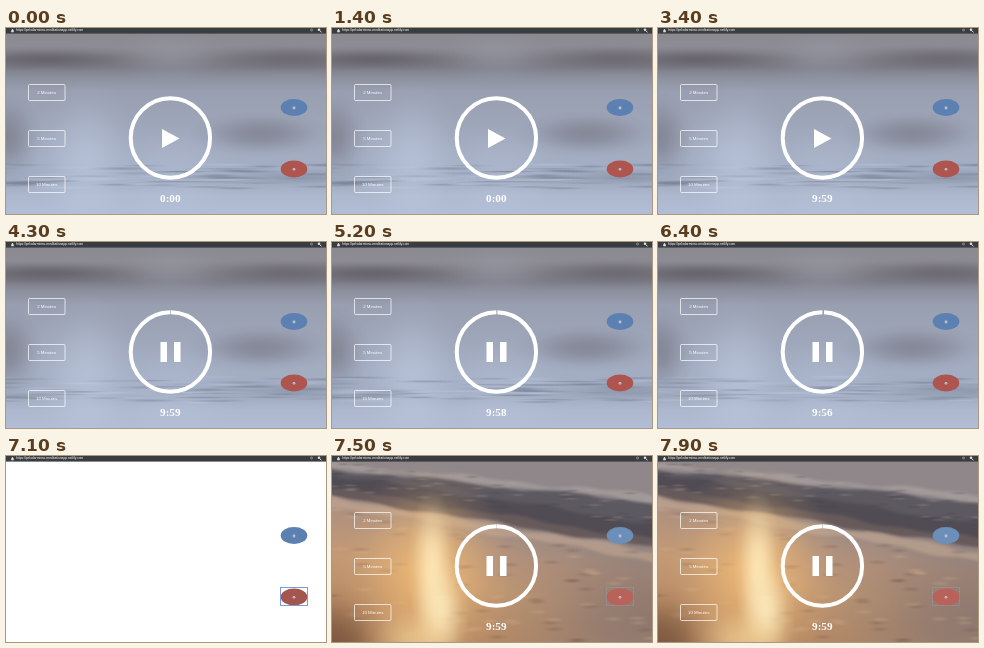
An HTML page with a canvas that plays this animation: 320 px wide and 186 px high, repeating every 8 s.

```html
<!DOCTYPE html>
<html lang="en">
<head>
<meta charset="utf-8">
<style>
html, body { margin: 0; width: 100%; height: 100%; overflow: hidden; background: #fff; }
canvas, svg { position: absolute; left: 0; top: 0; width: 320px; height: 186px; }
text { font-family: "Liberation Sans", Arial, sans-serif; fill: #fff; }
</style>
</head>
<body>
<canvas id="bg" width="320" height="186"></canvas>
<svg viewBox="0 0 320 186">
  <rect width="320" height="5.6" fill="#3a3d40"/>
  <path d="M5.2 2.2h2.6v2h-2.6zM5.8 2.2v-.6a.7 .7 0 0 1 1.4 0v.6" fill="#ddd"/>
  <text x="10" y="3.4" font-size="3.28">https://pelodarminso-meditationapp.netlify.com</text>
  <circle cx="305.5" cy="2" r="1" fill="none" stroke="#bbb" stroke-width=".6"/>
  <circle cx="313" cy="1.8" r="1.3" fill="#ddd"/>
  <path d="M313.5 2.5l2 1.7" stroke="#ddd"/>
  <g id="choices"></g>
  <path id="ring" fill="none" stroke="#fff" stroke-width="4"/>
  <path id="play" d="M156 101v19l17.5-9.5z" fill="#fff"/>
  <path id="pause" d="M154.5 100h6.5v20h-6.5zM168 100h6.5v20h-6.5z" fill="#fff"/>
  <text id="clock" x="164.3" y="174" font-size="11.2" font-weight="700" text-anchor="middle" style="font-family:'Liberation Serif','Times New Roman',serif"></text>
  <ellipse id="rain" cx="288" cy="79.5" rx="13.3" ry="8.5"/>
  <ellipse id="beach" cx="288" cy="141" rx="13.3" ry="8.5"/>
  <g fill="#cbd2dc"><circle cx="288" cy="80" r="1.4"/><circle cx="288" cy="141.3" r="1.3"/></g>
  <path d="M287 80h1.5M287.3 141.3h1.4" stroke="#77798a" stroke-width=".6"/>
  <rect id="focus" x="274.5" y="131.5" width="27" height="18" fill="none"/>
</svg>
<script>
const $ = id => document.getElementById(id);
const ctx = $("bg").getContext("2d");
const W = 320, H = 186, LOOP = 8000;

$("choices").innerHTML = [2, 5, 10].map((n, i) => {
  const y = 56.5 + i * 46;
  return `<rect x="22.5" y="${y}" width="36.5" height="16" rx="1" fill="none" stroke="#fff" stroke-opacity=".7"/>
    <text x="40.7" y="${y + 9.6}" font-size="4.4" text-anchor="middle">${n} Minutes</text>`;
}).join("");

function random(seed) {
  return () => (seed = (seed * 16807) % 2147483647) / 2147483647;
}

function fill(gradient, stops) {
  stops.forEach(([at, color]) => gradient.addColorStop(at, color));
  ctx.fillStyle = gradient;
  ctx.fillRect(0, 0, W, H);
}

// soft ellipse with radii rx, ry
function glow(x, y, rx, ry, rgb, alpha) {
  ctx.save();
  ctx.translate(x, y);
  ctx.scale(rx, ry);
  const g = ctx.createRadialGradient(0, 0, 0, 0, 0, 1);
  [1, .84, .5, .16, 0].forEach((k, i) => g.addColorStop(i / 4, `rgba(${rgb},${alpha * k})`));
  ctx.fillStyle = g;
  ctx.fillRect(-1, -1, 2, 2);
  ctx.restore();
}

function drawRain(s) {
  const dark = "96,92,100", light = "196,208,230";
  fill(ctx.createLinearGradient(0, 0, 0, H), [
    [.03, "#8b8a91"], [.1, "#8d8c94"], [.17, "#7f7e87"], [.21, "#7c7c87"],
    [.27, "#8d919f"], [.34, "#989fb0"], [.5, "#9da5b8"], [.68, "#a3adc2"],
    [.76, "#a2adc3"], [.83, "#a0abc0"], [.9, "#adb8ce"], [1, "#b1bdd5"]
  ]);
  glow(40, 31, 110, 13, "74,68,74", .45);
  glow(285, 30, 100, 15, "74,68,74", .35);
  glow(165, 30, 60, 30, "165,170,184", .3);
  glow(0, 110, 38, 48, dark, .45);
  glow(255, 106, 75, 24, dark, .42);
  glow(80, 135, 55, 85, light, .5);
  glow(165, 150, 75, 60, light, .25);

  // ripples drift and swell with the video time s
  const rnd = random(71);
  for (let i = 0; i < 60; i++) {
    const y = 136 + 24 * rnd(), phase = rnd() * 7, dir = i % 2 ? 1 : -1;
    const x = (rnd() * 400 + s * 14 * dir + 400) % 400 - 40;
    const a = .24 + .1 * Math.sin(s * 4 + phase);
    glow(x, y + Math.sin(s * 3 + phase), 20 + rnd() * 30, 1.3 + rnd(), i % 3 ? "92,101,120" : light, a);
  }
  glow(300, 149, 85, 9, "92,100,118", .25);
}

// stripe sloping down to the right, following the shoreline
function band(y, slope, height, color, s, seed) {
  const edge = x => y + x * slope + 1.6 * Math.sin(x / 23 + seed + s * 2) + Math.sin(x / 9 + seed * 3);
  ctx.fillStyle = color;
  ctx.beginPath();
  for (let x = -10; x <= 330; x += 5) ctx.lineTo(x, edge(x));
  for (let x = 330; x >= -10; x -= 5) ctx.lineTo(x, edge(x + 30) + height);
  ctx.fill();
}

function drawBeach(s) {
  fill(ctx.createLinearGradient(40, 0, 0, H), [
    [0, "#8f878a"], [.2, "#988a85"], [.36, "#b3927c"], [.55, "#c39a74"],
    [.8, "#b98c65"], [1, "#a17655"]
  ]);
  glow(320, 165, 200, 105, "136,116,110", .9);
  const rnd = random(19);
  ctx.filter = "blur(1.5px)";
  band(11, .11, 21, "#5d5961", s, 1);
  band(19, .15, 15, "#514c54", s, 2);
  band(32, .16, 4, "#675a5b", s, 3);
  band(7, .1, 3, "rgba(176,166,163,.6)", s, 5);
  band(41, .17, 4, "rgba(203,174,150,.5)", s, 6);
  ctx.filter = "none";
  for (let i = 0; i < 70; i++) {
    const x = rnd() * W, y = 6 + rnd() * 30 + x * .1;
    glow(x + s * 6, y, 10, 2, i % 2 ? "180,168,164" : "64,60,70", .22);
  }
  for (let i = 0; i < 80; i++) {
    const x = rnd() * W, y = 52 + x * .14 + rnd() * 110;
    glow(x, y, 12, 3, i % 2 ? "226,188,150" : "92,70,64", .2);
  }
  glow(0, 186, 60, 60, "96,66,48", .55);
  glow(95, 115, 85, 110, "255,196,118", .65);
  glow(100, 108, 25, 75, "255,236,188", .85);
  glow(108, 155, 30, 55, "255,240,196", .8);
  glow(85, 186, 60, 40, "255,222,160", .6);
}

const show = (id, on) => $(id).style.display = on ? "" : "none";

function paint(t) {
  const blank = t >= 6600 && t < 7500, sand = t >= 7500;
  const playing = t >= 3600 && !blank;
  ctx.fillStyle = "#fff";
  ctx.fillRect(0, 0, W, H);
  if (sand) drawBeach((t - 7500) / 1000);
  else if (!blank) drawRain(Math.max(0, t - 3600) / 1000);

  const ticks = playing && !sand ? Math.floor((t - 3600) / 900) : 0;
  $("clock").textContent = t < 3400 ? "0:00" : "9:" + (59 - ticks);
  const elapsed = sand ? (t - 7500) / 1000 : Math.max(0, t - 3600) / 900;
  const a = elapsed / 600 * 2 * Math.PI + (playing ? .008 : 0);
  $("ring").setAttribute("d",
    `M${164.4 + 39.7 * Math.sin(a)} ${110 - 39.7 * Math.cos(a)}A39.7 39.7 0 0 1 164.4 149.7A39.7 39.7 0 0 1 164.4 70.3`);
  show("play", !playing);
  show("pause", playing);

  const hover = t >= 6800;
  $("rain").setAttribute("fill", sand ? "#6c8fba" : "#5d80b2");
  $("beach").setAttribute("fill", sand ? "#b9625a" : hover ? "#a4564e" : "#ae554f");
  show("focus", hover);
  $("focus").setAttribute("stroke", sand ? "rgba(150,165,195,.5)" : "#7d9bdc");
  $("focus").setAttribute("stroke-dasharray", sand ? "2 1" : "none");
}

let last = -1;
function frame(now) {
  const t = Math.floor(now % LOOP / 100) * 100;
  if (t !== last) paint(last = t);
  requestAnimationFrame(frame);
}
paint(0);
requestAnimationFrame(frame);
</script>
</body>
</html>
```
